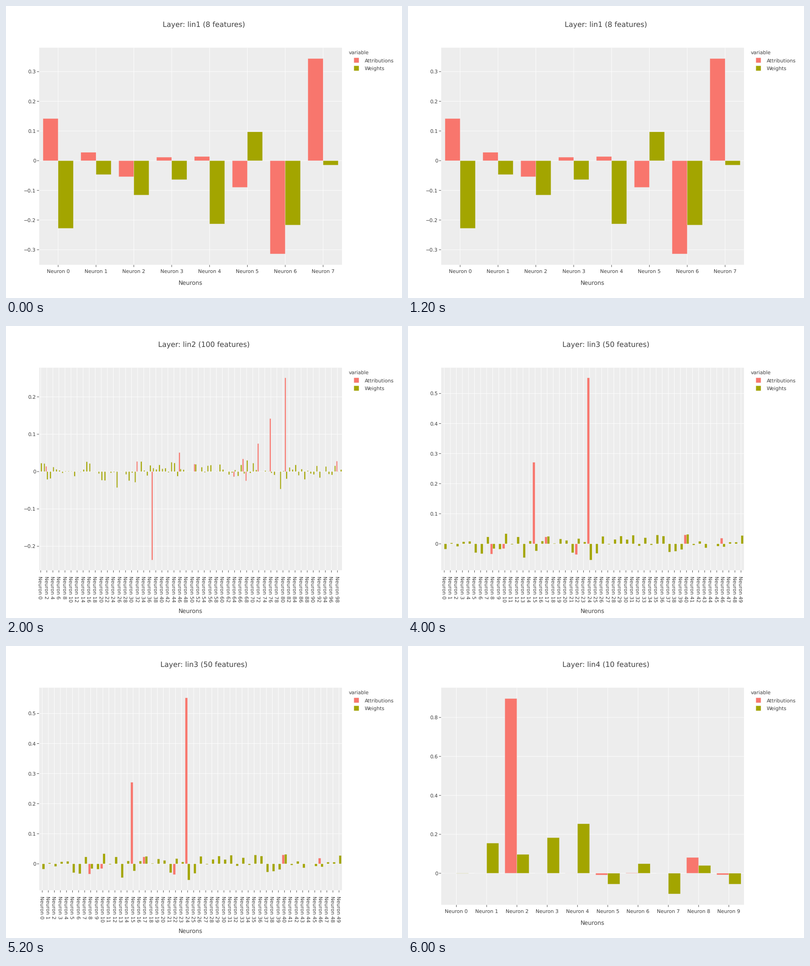
Recreate the animation shown at these times as a matplotlib script. Size 872x642 px, loop 8 s.

```python
import math
import random

import matplotlib.pyplot as plt
from matplotlib.animation import FuncAnimation

WIDTH, HEIGHT, DPI = 872, 642, 64
LEFT, RIGHT, TOP = 73.2, 739.9, 91.7
CORAL, OLIVE = "#F8766D", "#A3A500"
PANEL, INK, TEXT = "#EDEDED", "#333333", "#404040"
PX = 72 / DPI  # points per pixel
LINE = 0.914 * PX


def noise(seed, count, spread, peak):
    """Small random weights; a higher peak crowds them around zero."""
    rng = random.Random(seed)
    draws = [rng.uniform(-1, 1) for _ in range(count)]
    return [spread * u * abs(u) ** peak for u in draws]


def with_peaks(values, peaks):
    return [peaks.get(i, value) for i, value in enumerate(values)]


# (attributions, weights) of each layer, in thousandths
LAYERS = [
    ([142, 28, -54, 12, 14, -90, -314, 344],
     [-228, -47, -116, -64, -213, 97, -217, -15]),
    (with_peaks([0] * 100, {2: 14, 32: 27, 37: -237, 46: 51, 51: 20, 64: -14,
                            67: 34, 68: -25, 72: 75, 76: 142, 81: 251, 98: 28}),
     with_peaks(noise(2, 100, 27, 1), {25: -43, 31: -29, 68: 30, 79: -47})),
    (with_peaks([0] * 50, {8: -34, 10: -16, 15: 271, 17: 23, 22: -36,
                           24: 552, 40: 30, 46: 19}),
     with_peaks(noise(3, 50, 34, 0), {13: -46, 24: -54})),
    ([0, 0, 897, 0, 1, -9, 2, 0, 81, -8],
     [-1, 155, 97, 183, 254, -56, 49, -106, 40, -56]),
]

plt.rcParams.update({"font.family": "DejaVu Sans", "text.hinting": "none",
                     "path.snap": False})
fig = plt.figure(figsize=(WIDTH / DPI, HEIGHT / DPI), dpi=DPI, facecolor="white")
ax = fig.add_axes([0, 0, 1, 1])


def write(x, y, text, size=10.95, ha="left", **kwargs):
    ax.text(x, y, text, fontsize=size * PX, color=TEXT, ha=ha, va="baseline",
            rotation_mode="anchor", **kwargs)


def line(xs, ys, color):
    ax.plot(xs, ys, color=color, lw=LINE, solid_capstyle="butt")


def block(x, y, width, height, color):
    ax.add_patch(plt.Rectangle((x, y), width, height, facecolor=color,
                               edgecolor=PANEL, lw=LINE / 2, zorder=3))


def draw_legend():
    write(755, 106.3, "variable")
    for y, color, name in [(119.4, CORAL, "Attributions"), (136.9, OLIVE, "Weights")]:
        block(766.1, y - 5.5, 11, 11, color)
        write(790, y + 4.2, name)


def draw_neuron_axis(centers, bottom, upright):
    label_step = 2 if len(centers) > 50 else 1
    for i, x in list(enumerate(centers))[::label_step]:
        line([x, x], [TOP, bottom], "white")
        line([x, x], [bottom + 0.4, bottom + 5], INK)
        if upright:
            write(x, 587, f"Neuron {i}", ha="center")
        else:
            write(x - 5.2, 549.8, f"Neuron {i}", rotation=270)
    write(406.6, 612.6 if upright else 630.6, "Neurons", 12.8, "center")


def draw_value_axis(low, high, to_y):
    step = 200 if high - low > 1000 else 100
    for value in range(math.ceil(low / step) * step, int(high) + 1, step):
        y = to_y(value)
        line([LEFT, RIGHT], [y, y], "white")
        line([LEFT - 5, LEFT - 0.4], [y, y], INK)
        write(66, y + 4, f"{value / 1000:g}".replace("-", "\u2212"), ha="right")


def draw(index):
    attributions, weights = LAYERS[index]
    ax.clear()
    ax.set(xlim=(0, WIDTH), ylim=(HEIGHT, 0))
    ax.set_axis_off()

    count = len(weights)
    upright = count <= 10
    bottom = 568.9 if upright else 536.9
    step = (RIGHT - LEFT) / count
    centers = [LEFT + step * (i + 0.5) for i in range(count)]

    # The value range leaves a margin of 1/18 of the data span at each end.
    values = attributions + weights
    margin = (max(values) - min(values)) / 18
    low, high = min(values) - margin, max(values) + margin

    def to_y(value):
        return TOP + (high - value) / (high - low) * (bottom - TOP)

    ax.add_patch(plt.Rectangle((LEFT, TOP), RIGHT - LEFT, bottom - TOP,
                               facecolor=PANEL, lw=0))
    draw_neuron_axis(centers, bottom, upright)
    draw_value_axis(low, high, to_y)

    bar, zero = 0.4 * step, to_y(0)
    for x, attribution, weight in zip(centers, attributions, weights):
        block(x - bar, zero, bar, to_y(attribution) - zero, CORAL)
        block(x, zero, bar, to_y(weight) - zero, OLIVE)

    write(436, 46, f"Layer: lin{index + 1} ({count} features)", 15.9, "center")
    draw_legend()
    return []


animation = FuncAnimation(fig, draw, frames=len(LAYERS), interval=2000,
                          init_func=lambda: draw(0), repeat=True, repeat_delay=0)
plt.show()
```
